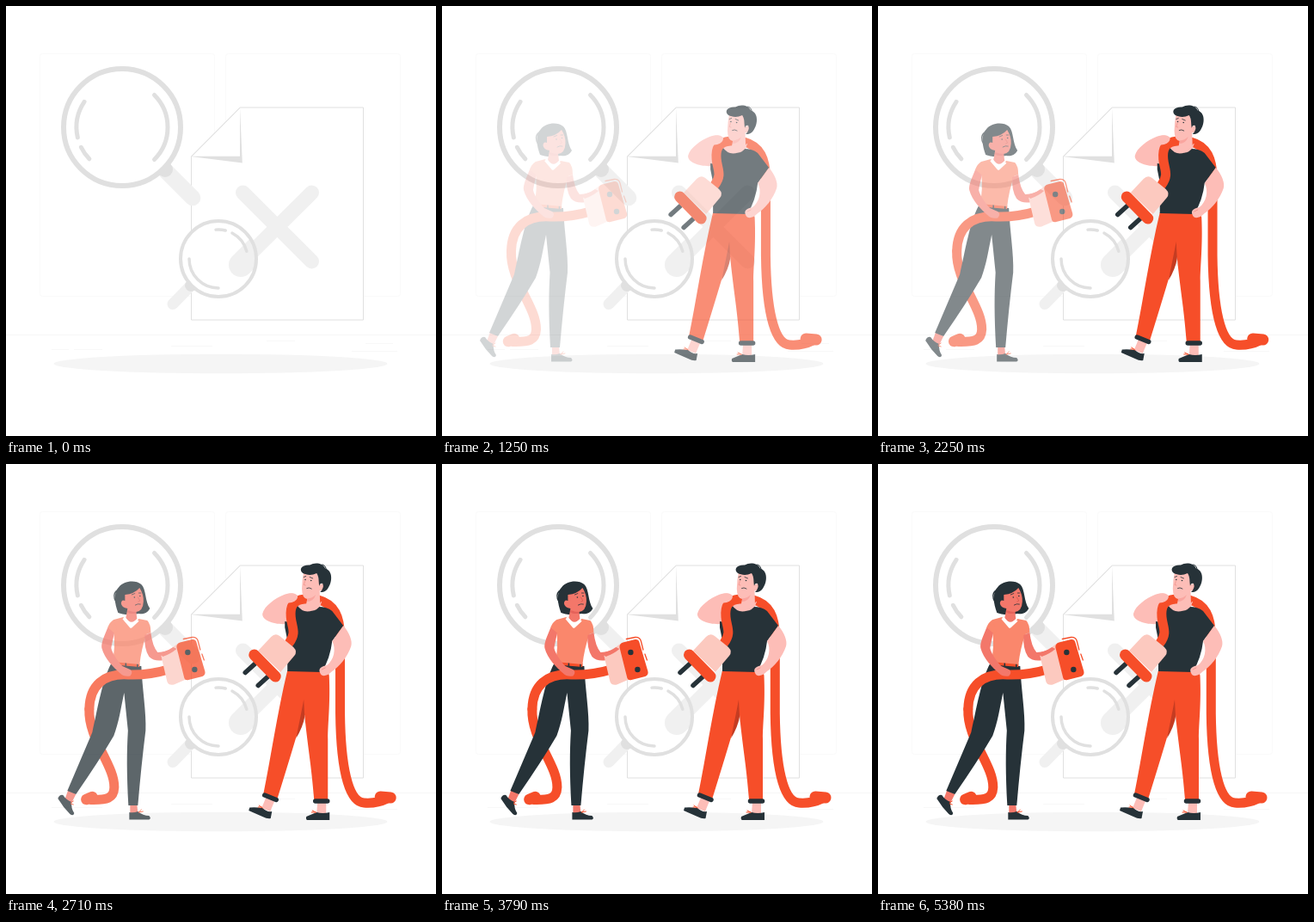
An HTML page with a canvas for the animation above (5430 ms loop, 500 px wide and 500 px high).

```html
<!DOCTYPE html>
<html lang="en">
<head>
<meta charset="utf-8">
<title>Connection lost</title>
<style>
html, body { margin: 0; width: 100%; height: 100%; overflow: hidden; background: #fff; }
canvas { display: block; width: 500px; height: 500px; }
</style>
</head>
<body>
<canvas id="stage" width="500" height="500"></canvas>
<script>
const LOOP = 5430;
const ORANGE = '#f64e29', DARK = '#263238', PALE = '#fcc9bf', PINK = '#fdbdb7';
const CORAL = '#f3776a', TOP = '#fa876c', GREY = '#e0e0e0', LIGHT = '#f0f0f0';

const stage = document.getElementById('stage').getContext('2d');
const makeLayer = () => Object.assign(document.createElement('canvas'), { width: 500, height: 500 }).getContext('2d');
const layer = makeLayer(), backdrop = makeLayer();
let pen = backdrop;

function fill(path, color) {
  pen.fillStyle = color;
  pen.fill(new Path2D(path));
}
function stroke(path, color, width, cap = 'round') {
  Object.assign(pen, { strokeStyle: color, lineWidth: width, lineCap: cap, lineJoin: 'round' });
  pen.stroke(new Path2D(path));
}
function dot(x, y, rx, color, ry = rx) {
  pen.beginPath();
  pen.ellipse(x, y, rx, ry, 0, 0, Math.PI * 2);
  pen.fillStyle = color;
  pen.fill();
}
function arc(x, y, r, from, to, width) {
  Object.assign(pen, { strokeStyle: GREY, lineWidth: width, lineCap: 'round' });
  pen.beginPath();
  pen.arc(x, y, r, from * Math.PI / 180, to * Math.PI / 180);
  pen.stroke();
}

function drawBackdrop() {
  fill('M0 0H500V500H0Z', '#fff');
  for (const x of [39.5, 255.5]) {
    pen.strokeStyle = '#fafafa';
    pen.lineWidth = 1;
    pen.beginPath();
    pen.roundRect(x, 55.5, 203, 282, 3);
    pen.stroke();
  }
  stroke('M0 382.5H500', '#f6f6f6', 1, 'butt');
  stroke('M53 399.5H73M79 399.5H112M192 395.5H240M303 389.5H336M402 401.5H455M418 392.5H450', '#f8f8f8', 1, 'butt');
  dot(249.5, 416, 194, '#f5f5f5', 11.3);

  // Document with folded corner and cross
  const sheet = 'M272.5 118H415.5V365H215.5V175.5Z';
  fill(sheet, '#fff');
  stroke(sheet, GREY, 1);
  fill('M215 175L272 118L274.8 182.5Z', GREY);
  fill('M216.5 174.7L272 119V174.7Z', '#fff');
  stroke('M275.5 217L355.5 297M355.5 217L275 297', LIGHT, 17);

  // Small magnifier
  stroke('M213 327L194 346.5', LIGHT, 13);
  stroke('M214 325L215 326', GREY, 12);
  dot(247, 294, 44, '#fff');
  pen.save();
  pen.beginPath();
  pen.arc(247, 294, 43, 0, 7);
  pen.clip();
  stroke('M305 269L273 301', LIGHT, 28);
  pen.restore();
  arc(247, 294, 44, 0, 360, 4);
  arc(247, 294, 34, 90, 180, 3.5);
  arc(247, 294, 34, 265, 284, 3.5);
  arc(247, 294, 34, 298, 345, 3.5);

  // Large magnifier
  stroke('M186 192L217 223', LIGHT, 18.5);
  stroke('M183 188L185 190', GREY, 18);
  dot(135, 141, 67, '#fff');
  arc(135, 141, 68, 0, 360, 6);
  arc(135, 141, 53, -45, 45, 5);
  arc(135, 141, 53, 167, 214, 5);
  arc(135, 141, 53, 136, 154, 5);
}

function drawMan() {
  // Cable hanging behind
  stroke('M362 158C381 163 387 178 387.300 200V290C388 350 396 393 415 394C428 395 436 392 442 389', ORANGE, 11);
  stroke('M434 387L446 388', ORANGE, 13);

  // Feet
  fill('M301 388L311 392L306 404L296 400Z', PINK);
  fill('M361 393H371V406H360Z', PINK);
  fill('M282 399.5Q290 399 297 400Q302 405 308 404L306.5 412Q303 413 297 410L281 403Z', DARK);
  fill('M348 410Q355 407 360 405Q367 407 375 405V414H349Q347 413 348 410Z', DARK);
  stroke('M297 400L293 397M296 399L292 399M359 405L355 403M359 405L354 405', ORANGE, 1);

  // Trousers
  fill('M326 240L367 241Q374 240 374.5 246C376 280 373 300 373 320V390H357C354 350 349 325 346 292L336 318Q328 345 314 390L298 384C307 340 314 290 326 240Z', ORANGE);
  fill('M345 274Q342 290 336 319Q344 306 346 294Z', '#c43c22');
  stroke('M299.5 385L313 390.5M358.5 392H372.5', DARK, 5.5);

  // Raised arm, neck and shirt
  fill('M325 186C311 187 296 182 297 174C299 165 312 156 322 152C330 149 338 150 339 156C336 161 330 163 329 165L330 186Z', PINK);
  fill('M336 160H366L363 168Q350 177 336 168Z', PINK);
  fill('M330 165L337 164Q347 178 362 166Q372 166 378 171L391 188L378 206Q376 225 366 242L326 241V205L323 190V183L330 184Z', DARK);
  fill('M391 188C398 196 402 206 400 212C396 224 386 236 378 241C372 247 366 248 364 243C361 237 367 235 372 234C380 228 383 215 378 206Z', PINK);
  stroke('M366 239L370 237', '#f08f88', .8);

  // Cable over the shoulder
  stroke('M360 158C355 156 351 157 346 157C332 158 329 166 330 178C331 190 337 196 328 208', ORANGE, 11);

  // Head
  fill('M345 125L361 127L364 140Q370 137 369.5 143Q368 149 363.5 147L364 165Q356 175 347 167L349 157Q343 156 342.8 145Q343 135 345 125Z', PINK);
  fill('M349 156.500Q355 156 359 152Q356 160 349 160Z', '#f9a59f');
  fill('M344 127C339 123 342 117 352 117.5C358 114 367 115 370 121.5C379 124 378 137 374 143C371 149 367 149 364 149Q369 144 367 139Q364 138 363 142C362 135 363 132 360 127C354 130 348 129 344 127Z', DARK);
  stroke('M366 117Q370 117 371 122', DARK, 1);
  dot(346.8, 134.5, .8, DARK);
  dot(353.5, 135.5, .8, DARK);
  stroke('M345 131.5L347.5 130.5M352 131.5L355.5 133', DARK, .8);
  stroke('M348.5 144.5Q351 143 354 145', DARK, .8);
  stroke('M346.5 136L345 140.5L347 141', '#f0948d', .8);

  // Hand and plug
  fill('M323 153Q331 148 338 153Q338 159 331 161L324 162Z', PINK);
  stroke('M288 232.5L277 242.5M303 247.500L292 257.5', DARK, 5.5);
  fill('M292 217L307 201Q312 196 317 200L333 213Q338 218 334 223L318 242Z', PALE);
  stroke('M287.5 222L312 247', ORANGE, 13);
}

function drawWoman() {
  // Lower cable
  stroke('M104.5 285C103 320 134 350 133.5 376C133 389 125 391 106 390.5', ORANGE, 11);
  stroke('M101 390L108 387', ORANGE, 12.5);

  // Feet
  fill('M80 379L89 384L84 394L76 390Z', CORAL);
  fill('M152 396H160L161 406H152Z', CORAL);
  fill('M68 389Q70 384 74 385Q78 391 84 393Q83 400 87 406Q86 410 82 407Q74 399 68 389Z', DARK);
  fill('M151 405Q156 406 161 404Q167 409 174 409Q177 412 174 413.5H151Z', DARK);
  stroke('M83 394L86 392M83 395L86 396M162 405L165 402M162 405L167 404', ORANGE, 1);

  // Trousers and belt
  fill('M130 232L165 235C166 260 171 290 170 310Q165 350 161 397H150C148 360 148 335 149.5 310L145 266C141 285 139 300 133 316Q116 345 89 384L79 380L108 312C114 285 120 250 130 232Z', DARK);
  stroke('M134 231.5L163 234', ORANGE, 4, 'butt');
  stroke('M147 230V235M160.5 231V236', DARK, 1.5, 'butt');

  // Blouse
  fill('M144 178L133 181Q128 184 126 190L133 196Q135 212 131.5 230L163 233Q165 215 171 198L176 196Q176 186 172 182L162 180L153 190Z', TOP);

  // Held arm, cable, plug
  fill('M169 199L176 196Q178 212 184 219Q193 219 202 214L208 217Q200 222 191 228Q180 230 174 224Q168 215 169 199Z', CORAL);
  stroke('M196 239C180 244 165 245.5 150 245C121 243 105 258 104.5 285', ORANGE, 11);
  fill('M188 223L207 209L218 250L203 256.5Q197 258 195 253Z', PALE);
  fill('M185 219Q193 219 202 213L206 215Q199 221 190 224Z', CORAL);
  fill('M210 207.5L224 204Q228 203.500 229 207L239 241Q240 245 236 247L220 251Q216 252 215 249L206 213Q206 208.5 210 207.5Z', ORANGE);
  dot(219, 219, 3.2, DARK);
  dot(227, 239, 3.2, DARK);
  stroke('M214 203.5L224 201.5Q229.500 201 231 206L233.5 216M235.500 221L238 228', ORANGE, 1.3);

  // Near arm
  fill('M126 190C122 200 118 208 119 214C122 226 134 238 140 243Q145 248 152 246.5Q156 242 152 239L143 235C138 230 131 220 130 214C131 207 133 200 134 195Z', CORAL);
  fill('M126 190L133 181L137 194L134 197Z', TOP);

  // Head
  fill('M138 173C134 162 132 150 139 143C144 136 158 134 165 140C171 146 169 160 175 168C172 174 166 175 162 174C150 176 143 175 138 173Z', DARK);
  stroke('M140 146C131 148 133 157 136 161', DARK, 1.4);
  fill('M146 152Q157 151 163 144Q168 152 167.5 160Q167 171 159 172L160 180Q153 188 147 179L149 168Q142 167 141.5 162Q142 157 146 159Z', CORAL);
  fill('M149 170Q154 172 159 172V173.5Q152 175 149 172.5Z', '#e5625a');
  stroke('M144.5 179L153 189L161 181.5', '#fff', 3.5, 'butt');
  dot(157, 155, .8, DARK);
  dot(163.5, 153.5, .8, DARK);
  stroke('M154 152L157.5 150.5M162 150L164.5 150', DARK, .8);
  stroke('M161 155L163.5 159L161.5 160', '#d9564d', .8);
  stroke('M158 164Q161 162 164 163', DARK, .8);
}

// Overshooting cubic-bezier(.36, -.01, .5, 1.38)
function ease(x) {
  if (x <= 0) return 0;
  if (x >= 1) return 1;
  const curve = (s, a, b) => 3 * (1 - s) ** 2 * s * a + 3 * (1 - s) * s * s * b + s ** 3;
  let low = 0, high = 1;
  for (let i = 0; i < 24; i++) {
    const mid = (low + high) / 2;
    if (curve(mid, .36, .5) < x) low = mid; else high = mid;
  }
  return curve(low, -.01, 1.38);
}

function slideIn(draw, progress) {
  const p = ease(progress);
  pen = layer;
  layer.setTransform(1, 0, 0, 1, 0, 0);
  layer.clearRect(0, 0, 500, 500);
  layer.translate(30 * (p - 1), 0);
  draw();
  stage.globalAlpha = Math.min(1, Math.max(0, p));
  stage.drawImage(layer.canvas, 0, 0);
  stage.globalAlpha = 1;
}

function render(now) {
  const t = now % LOOP;
  stage.drawImage(backdrop.canvas, 0, 0);
  if (t >= 290) {
    slideIn(drawMan, (t + 90) / 3000);
    slideIn(drawWoman, (t + 40) / 5500);
  }
}

drawBackdrop();
const start = performance.now();
function tick() {
  render(performance.now() - start);
  requestAnimationFrame(tick);
}
tick();
</script>
</body>
</html>
```
